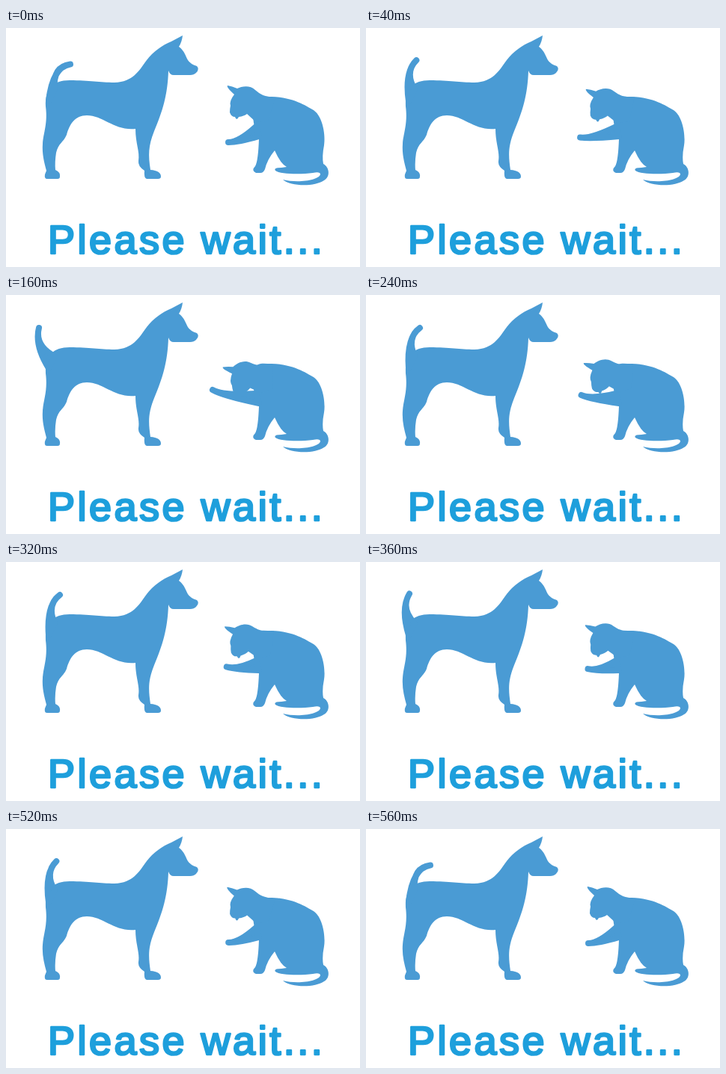
Write an HTML page that moves like this. It is 473 by 320 pixels and loops after 600 ms.

```html
<!DOCTYPE html>
<html lang="en">
<head>
<meta charset="utf-8">
<title>Please wait</title>
<style>
  html, body { margin: 0; width: 100%; height: 100%; overflow: hidden; background: #fff; }
  svg { display: block; fill: #4a9bd4; }
  .limb { stroke: #4a9bd4; stroke-width: 8; stroke-linejoin: round; }
  text {
    font: 54px "Liberation Sans", Arial, sans-serif;
    letter-spacing: 3.5px;
    fill: #1e9fdc; stroke: #1e9fdc; stroke-width: 2.7; stroke-linejoin: round;
  }
</style>
</head>
<body>
<svg width="473" height="320" viewBox="0 0 473 320">
  <!-- dog -->
  <path d="M236 10Q235 19 231 25C239 31 240 38 243 43Q246 48 255 51Q259 55 254 60Q251 63 246 63H224Q219 63 217 57
    C216 90 209 112 198 138C190 158 190 170 193 190Q207 191 207 199Q207 202 203 202H188Q184 201 185 191
    Q176 185 177 178C179 165 173 155 173 135C145 138 130 117 108 117C92 117 85 129 81 143C77 153 70 154 67 167
    Q65 180 66 190Q73 193 72 199Q72 202 69 202H55Q51 202 52 196L54 191C51 180 48 168 49 155
    C50 140 56 128 53 105C52 82 62 70 85 70C112 70 125 73 145 73C170 72 177 58 188 43C197 31 209 23 221 18Z"/>
  <path id="tail" class="limb"/>
  <!-- cat -->
  <path d="M330 100C336 89 344 92 355 92C385 93 400 104 411 110C424 119 427 145 425 157Q422 172 424 182
    C432 186 434 199 425 204C412 213 380 212 370 203C390 208 418 204 420 196Q420 192 410 194
    C395 196 366 196 360 191Q357 187 368 187L375 186Q367 182 359 164Q349 176 346 189Q344 194 340 194
    H334Q327 191 333 185Q337 178 338 148Q328 130 330 100Z"/>
  <path id="head" d="M360 93C345 92 340 89 333 83C326 76 315 78 309 81Q302 78 296 77Q294 79 305 89Q298 98 300 104
    Q299 108 299 113Q301 119 306 119Q308 125 311 119Q318 118 322 115L334 126L350 125Z"/>
  <path id="arm" class="limb"/>
  <text x="56" y="301.5">Please wait...</text>
</svg>
<script>
const STEP = 40, LAST = 14;
const el = id => document.getElementById(id);
const lerp = (a, b, t) => a + (b - a) * t;

// Tapered limb: two curves from the root's sides that meet at the tip.
function limb(id, sideA, sideB, bend, tip) {
  el(id).setAttribute('d', `M${sideA}Q${bend} ${tip}Q${bend} ${sideB}Z`);
}

// Two wags per loop, mirrored about its middle.
function wagTail(step) {
  const u = Math.abs(step - LAST / 2);
  const swing = Math.min(u / 4, (7 - u) / 3);
  const tip = [lerp(86, 30, swing), 42.5 + 24 * (swing - 0.5) ** 2];
  const bend = [lerp(62, 30, swing), lerp(52, 73, swing)];
  limb('tail', [57, 98], [65, 82], bend, tip);
}

// The paw reaches out quickly, then is drawn back slowly, closer to the body.
function washPaw(step) {
  const reach = Math.min(step / 4, ((LAST - step) / 10) ** 1.4);
  const side = step < 4 ? -1 : 1;
  const x = 297 - 21 * reach + 8 * side * Math.sin(Math.PI * reach);
  const y = 153 - 26 * reach;
  limb('arm', [334, 132], [338, 145], [x + 14, y + 8 * reach], [x, y]);
  el('head').setAttribute('transform', `translate(0 ${3 * reach}) rotate(${-18 * reach} 345 105)`);
}

function frame() {
  const step = Math.floor(performance.now() / STEP) % (LAST + 1);
  wagTail(step);
  washPaw(step);
  requestAnimationFrame(frame);
}
frame();
</script>
</body>
</html>
```
